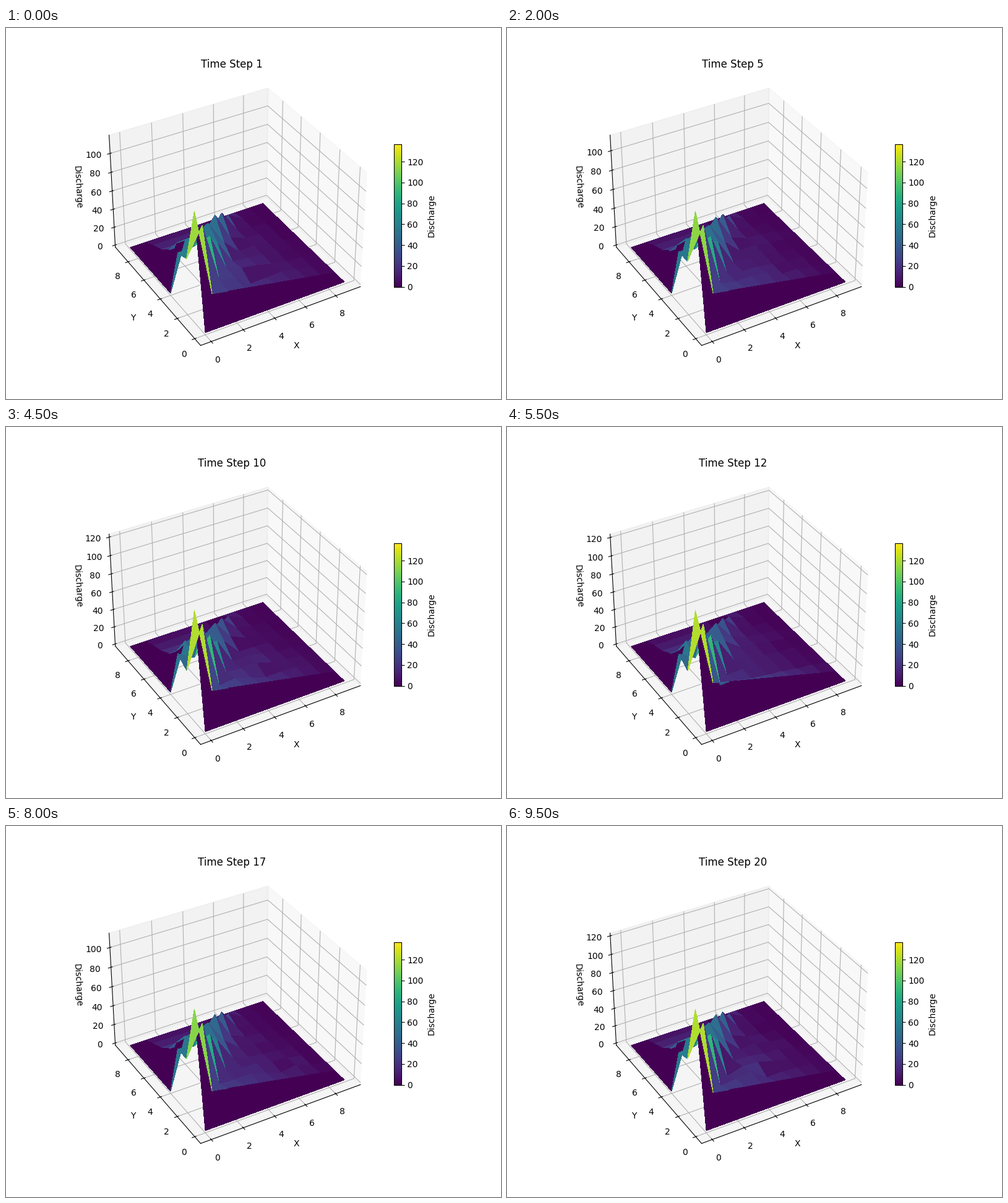
Write a matplotlib script that moves like this. It is 800 px wide and 600 px high and loops after 10 s.

```python
import numpy as np
import matplotlib.pyplot as plt
from matplotlib.animation import FuncAnimation
from matplotlib.cm import ScalarMappable
from matplotlib.colors import Normalize

STEPS = 20
SIZE = 10
MAX_DISCHARGE = 136.9

X, Y = np.meshgrid(np.arange(SIZE), np.arange(SIZE))
LANE = Y - X  # diagonal flow lanes, counted away from the main channel


def wave(step, period, crest):
    return np.cos(2 * np.pi * (step - crest) / period)


def discharge(step):
    rng = np.random.default_rng(step)
    peak = 117.6 + 5.8 * wave(step, 13, 9.4) + 2.5 * wave(step, 5.9, 1)
    spill = 25 + 12 * np.exp(-((step - 12) / 1.8) ** 2)
    season = 1 + 0.12 * wave(step, STEPS, 1)

    # Plain that fades away from the inlet, with its front row fed by the spill.
    z = 24 * (9 - X) / 8 * (1 - 0.08 * (Y - 1))
    z *= 1 + 0.18 * rng.standard_normal(z.shape)
    z[1] = spill * (9 - X[1]) / 8

    main = peak * np.exp(-0.25 * X - 0.04 * X**2)
    second = 52 * season * np.exp(-0.05 * X - (X / 5.8) ** 6)
    third = 54 * np.exp(-(X / 3) ** 3)
    fringe = 35 * season * 0.55 ** (Y - 5.0)
    lanes = [LANE == 1, LANE == 2, LANE == 3, LANE >= 4]
    z = np.select(lanes, [main, second, third, fringe], z)

    # Dry border, apart from the three inlet cells.
    z[0] = z[-1] = z[:, -1] = 0
    z[4:, 0] = 0
    return np.clip(z, 0, None)


fig = plt.figure(figsize=(8, 6), dpi=100)
ax = fig.add_subplot(projection="3d")
ax.view_init(elev=35, azim=-120)
ax.set_xlabel("X")
ax.set_ylabel("Y")
ax.set_zlabel("Discharge")

colors = ScalarMappable(Normalize(0, MAX_DISCHARGE), "viridis")
fig.colorbar(colors, ax=ax, shrink=0.5, aspect=20, label="Discharge")


def update(index):
    for surface in list(ax.collections):
        surface.remove()
    z = discharge(index + 1)
    ax.plot_surface(X, Y, z, facecolors=colors.to_rgba(z), shade=False,
                    linewidth=0, antialiased=False)
    ax.set_zlim(0, z.max(), view_margin=1 / 48)
    ax.set_title(f"Time Step {index + 1}")
    return []


anim = FuncAnimation(fig, update, frames=STEPS, interval=500, repeat=True)
plt.show()
```
